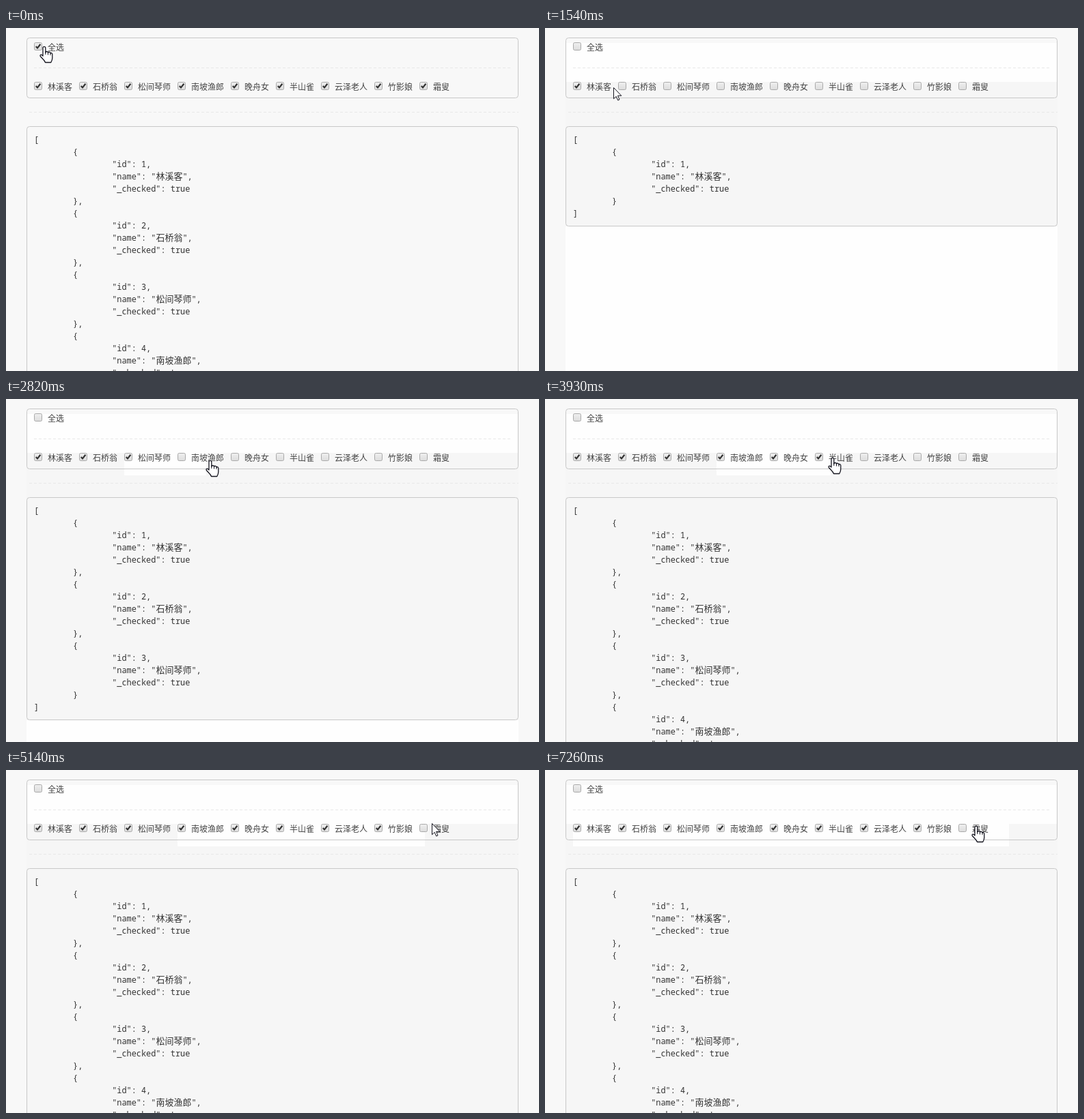
These frames come from a looping animation (780 px wide and 503 px high, 8 s). An HTML page with a canvas:

```html
<!DOCTYPE html>
<html lang="zh">
<head>
<meta charset="utf-8">
<style>
  html, body { margin: 0; width: 100%; height: 100%; overflow: hidden; background: #f8f8f8; }
  #stage { position: absolute; left: 0; top: 0; width: 780px; height: 503px; overflow: hidden; color: #333; }
  canvas { position: absolute; left: 0; top: 0; }
  .label { position: absolute; white-space: nowrap; color: #444;
           font: 12px/18px "Noto Sans CJK SC", "Noto Sans CJK", sans-serif; }
  pre { position: absolute; left: 41px; top: 154px; margin: 0; tab-size: 8;
        font: 11.9px/18px "Noto Sans Mono", "DejaVu Sans Mono", monospace; }
  pre span { font: 13px/0 "Noto Sans CJK SC", "Noto Sans CJK", sans-serif; }
  svg { position: absolute; left: 0; top: 0; width: 30px; height: 30px; overflow: visible; }
  svg path { fill: #fff; stroke: #15151f; stroke-linejoin: round; }
</style>
</head>
<body>
<div id="stage">
  <canvas id="view" width="780" height="503"></canvas>
  <pre id="json"></pre>
  <svg id="pointer">
    <path id="arrow" d="M.5 .5V16.8L4.2 13.3 6.7 19 9 18 6.5 12.3H11.8Z"/>
    <g id="hand">
      <path stroke-width="1.3" d="M-2 14V2.2a1.9 1.9 0 0 1 3.8 0V9q.3-1.6 2-1.5 1.6.1 1.7 1.7 .5-1.1 1.9-.9 1.5.2 1.6 1.8 .5-.8 1.5-.5 1.3.4 1.3 2V17q0 3-2 6.5H1.5q-1-2.5-3.5-5L-5.7 14.5q-.8-1.5.4-2.2 1.3-.6 3.3 1.7Z"/>
      <path d="M1.8 8v4M5.5 9v3.5M9 10v3"/>
    </g>
  </svg>
</div>
<script>
const LOOP = 8000;
const CLEAR = 280;                // everything is unchecked
const MOVE = 960, STEP = 134;     // the screen then updates at this pace
const LAST_OFF = 7250;            // the last item is unchecked again
const WHITE = '#fefefe', GREY = '#f6f6f6';

const $ = id => document.getElementById(id);
const stage = $('stage'), json = $('json'), ctx = $('view').getContext('2d');

const names = ['林溪客', '石桥翁', '松间琴师', '南坡渔郎', '晚舟女', '半山雀', '云泽老人', '竹影娘', '霜叟'];
let nextX = 41;
const items = names.map((name, i) => {
  const x = nextX;
  nextX += 30 + name.length * 12;
  return { id: i + 1, name, x, end: nextX - 10, checkAt: 1340 + 500 * i };
});

// pointer waypoints: time, x, y
const rest = [56, 27];
const path = [[MOVE, 95, 106], [1340, 72, 88], [1900, 171, 84], [2836, 299, 90], [3908, 421, 86],
              [5114, 623, 78], [5700, 671, 88], [6260, 633, 83], [7260, 631, 82]];

// hold the picture between screen updates
const snap = t => t < MOVE - 20 ? t : MOVE + STEP * Math.floor((t - MOVE + 20) / STEP);

function pointerAt(t) {
  if (t < MOVE) return rest;
  const i = path.findIndex(p => p[0] > t);
  if (i < 0) return path[path.length - 1].slice(1);
  const [t0, x0, y0] = path[i - 1], [t1, x1, y1] = path[i];
  const k = (t - t0) / (t1 - t0);
  return [Math.round(x0 + (x1 - x0) * k), Math.round(y0 + (y1 - y0) * k)];
}

function isChecked(item, t) {
  if (t < CLEAR) return true;
  return t >= item.checkAt && !(item.id === items.length && t >= LAST_OFF);
}

function fill(x0, y0, x1, y1, color) {
  ctx.fillStyle = color;
  ctx.fillRect(x0, y0, x1 - x0, y1 - y0);
}

function panel(x, y, w, h) {
  ctx.strokeStyle = '#c8c8c8';
  ctx.beginPath();
  ctx.roundRect(x + .5, y + .5, w, h, 4);
  ctx.stroke();
}

function dashes(x0, x1, y) {
  ctx.strokeStyle = '#e8e8e8';
  ctx.setLineDash([4, 3]);
  ctx.beginPath();
  ctx.moveTo(x0, y + .5);
  ctx.lineTo(x1, y + .5);
  ctx.stroke();
  ctx.setLineDash([]);
}

function checkbox(x, y, on) {
  const shade = ctx.createLinearGradient(0, y, 0, y + 12);
  shade.addColorStop(0, '#f0f0f0');
  shade.addColorStop(1, '#dcdcdc');
  ctx.fillStyle = shade;
  ctx.strokeStyle = '#a9a9a9';
  ctx.beginPath();
  ctx.roundRect(x + .5, y + .5, 11, 11, 2);
  ctx.fill();
  ctx.stroke();
  if (!on) return;
  ctx.strokeStyle = '#333';
  ctx.lineWidth = 2.2;
  ctx.beginPath();
  ctx.moveTo(x + 2.8, y + 6);
  ctx.lineTo(x + 5, y + 8.4);
  ctx.lineTo(x + 9.4, y + 2.8);
  ctx.stroke();
  ctx.lineWidth = 1;
}

// the white strip the pointer has wiped along the row of items
function trail(t, done) {
  if (done < 3) return;
  const first = done === items.length ? 0 : Math.min(done, 4) - 1;
  let right = 0;
  for (let s = MOVE; s < t - 1; s += STEP) right = Math.max(right, pointerAt(s)[0] + 12);
  fill(items[first].x, 79, right, 112, WHITE);
}

function backdrop(t, lines) {
  fill(0, 0, 780, 503, '#f8f8f8');
  if (t < CLEAR) return;
  fill(30, 22, 750, 503, WHITE);
  const done = items.filter(item => t >= item.checkAt).length;
  if (done) fill(30, 79, 750, 165 + 18 * lines, GREY);
  trail(t, done);
}

function listing(chosen) {
  if (!chosen.length) return '[]';
  const blocks = chosen.map(({ id, name }) =>
    `\t{\n\t\t"id": ${id},\n\t\t"name": "<span>${name}</span>",\n\t\t"_checked": true\n\t}`);
  return `[\n${blocks.join(',\n')}\n]`;
}

function movePointer([x, y]) {
  const onItem = y >= 79 && y < 95 && items.some(it => x >= it.x && x < it.end);
  const onAll = y >= 20 && y < 37 && x >= 41 && x < 85;
  const over = onItem || onAll;
  $('pointer').style.transform = `translate(${x}px, ${y}px)`;
  $('hand').style.display = over ? '' : 'none';
  $('arrow').style.display = over ? 'none' : '';
}

let lastListing = '';
function draw(t) {
  const chosen = items.filter(item => isChecked(item, t));
  const lines = chosen.length ? chosen.length * 5 + 2 : 1;

  backdrop(t, lines);
  panel(30, 14, 719, 88);
  panel(30, 144, 719, 20 + 18 * lines);
  dashes(41, 740, 58);
  dashes(34, 750, 123);
  checkbox(41, 21, chosen.length === items.length);
  items.forEach(item => checkbox(item.x, 79, isChecked(item, t)));

  const text = listing(chosen);
  if (text !== lastListing) json.innerHTML = lastListing = text;
  movePointer(pointerAt(t));
}

function addLabel(text, x, y) {
  const el = document.createElement('div');
  el.className = 'label';
  el.textContent = text;
  el.style.left = x + 'px';
  el.style.top = y + 'px';
  stage.insertBefore(el, json);
}

addLabel('全选', 61, 19);
items.forEach(item => addLabel(item.name, item.x + 20, 77));

const start = performance.now();
function tick() {
  draw(snap((performance.now() - start) % LOOP));
  requestAnimationFrame(tick);
}
tick();
</script>
</body>
</html>
```
